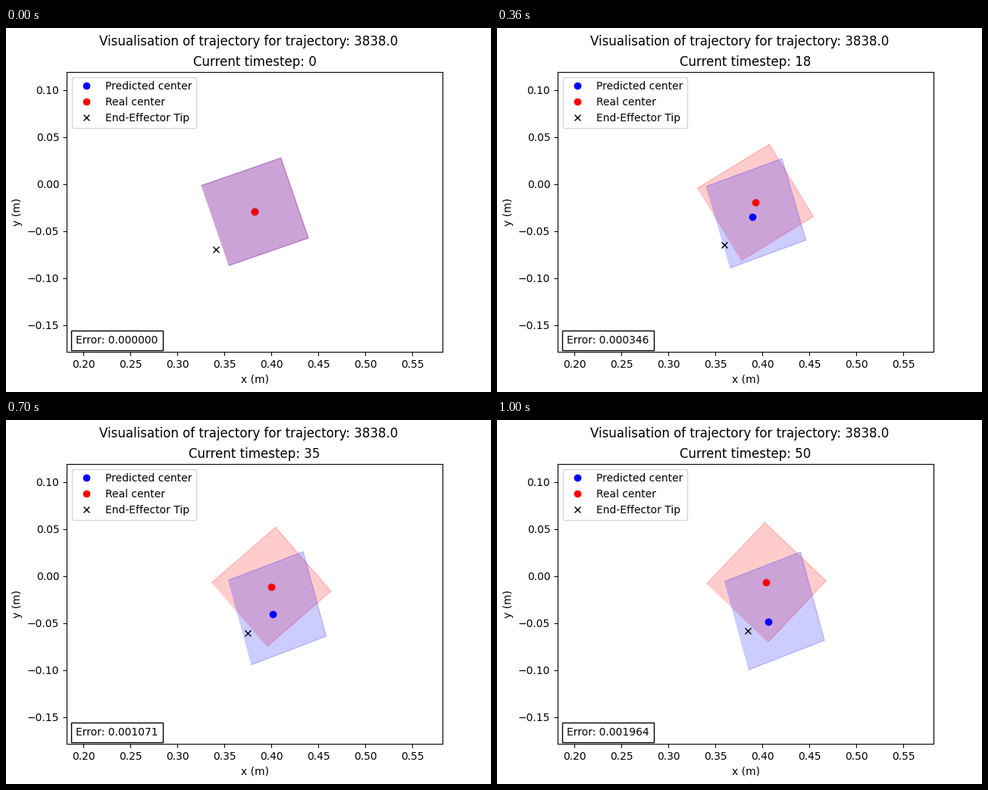
A matplotlib script that plays this animation: 640x480 px, repeating every 1.02 s.

```python
import numpy as np
import matplotlib.pyplot as plt
from matplotlib.animation import FuncAnimation
from matplotlib.patches import Polygon

STEPS = 51
SCALE = 1240            # pixels per metre
CX, CY = 0.3822, -0.0294
SIDE = 0.09


def ease(t, *amps):
    """Run from 0 to 1, bent by a sine series that vanishes at both ends."""
    return t + sum(a * np.sin(k * np.pi * t) for k, a in enumerate(amps, 1))


def to_data(x, y):
    """Pixel offset from the start centre, y downwards, to metres."""
    return np.array([CX + x / SCALE, CY - y / SCALE])


def real_pose(t):
    """Pushed box: centre, corners and the tip that pushes it."""
    s = ease(t, 0.098, 0.01, 0.036, 0.012)
    bow = np.sin(np.pi * s)
    centre = to_data(0.2 + 27.2 * s + 0.7 * bow, -28.3 * s)
    turn = np.radians(19 + 27.5 * s + 0.4 * bow)
    spin = turn + np.pi / 4 + np.pi / 2 * np.arange(2, 6)
    ring = np.column_stack([np.cos(spin), np.sin(spin)])
    tip = to_data(-51 + 53.9 * s, 49.8 - 14.1 * s)
    return centre, centre + ring * SIDE / np.sqrt(2), tip


def predicted_pose(t):
    """Predicted box: it drifts and slowly stretches out of square."""
    grow = t ** 1.7
    centre = to_data(0.2 + 30.1 * ease(t, -0.03, -0.06, 0, 0.02, -0.05),
                     24 * ease(t, -0.2, 0.04, -0.04, 0, -0.06))
    mid = np.array([0.3 + 37.8 * ease(t, 0, -0.02, 0, 0.02, -0.05),
                    9.4 * t ** 2 - 1.3 * np.sin(5 * np.pi * t)])
    left = np.array([-34.3, 71 + 6.8 * grow])
    right = np.array([70.7 - 4.7 * t - 3.3 * np.sin(np.pi * t),
                      34.6 + 4.2 * grow])
    corners = [to_data(*(mid + d)) for d in (left, right, -left, -right)]
    return centre, corners


fig, ax = plt.subplots(figsize=(6.4, 4.8), dpi=100)
fig.suptitle("Visualisation of trajectory for trajectory: 3838.0", y=0.982)
ax.set_xlim(CX - 248 / SCALE, CX + 248 / SCALE)
ax.set_ylim(CY - 184.8 / SCALE, CY + 184.8 / SCALE)
ax.set_xlabel("x (m)")
ax.set_ylabel("y (m)")
title = ax.set_title("", pad=5.4)

real_box, pred_box = (
    ax.add_patch(Polygon(np.zeros((4, 2)), closed=False, color=c, alpha=0.2))
    for c in ("red", "blue"))
pred_dot, = ax.plot([], [], "o", color="blue", label="Predicted center")
real_dot, = ax.plot([], [], "o", color="red", label="Real center")
tip_mark, = ax.plot([], [], "x", color="black", label="End-Effector Tip")
ax.legend(loc="upper left")
error = ax.text(0.025, 0.031, "", transform=ax.transAxes,
                bbox=dict(facecolor="white", pad=4.3))


def update(step):
    t = step / (STEPS - 1)
    real, real_corners, tip = real_pose(t)
    pred, pred_corners = predicted_pose(t)
    real_box.set_xy(real_corners)
    pred_box.set_xy(pred_corners)
    for mark, (x, y) in ((real_dot, real), (pred_dot, pred), (tip_mark, tip)):
        mark.set_data([x], [y])
    title.set_text(f"Current timestep: {step}")
    error.set_text(f"Error: {0.001964 * t ** 1.7:.6f}")
    return real_box, pred_box, real_dot, pred_dot, tip_mark, title, error


anim = FuncAnimation(fig, update, frames=STEPS, interval=20,
                     repeat=True, repeat_delay=0)
plt.show()
```
